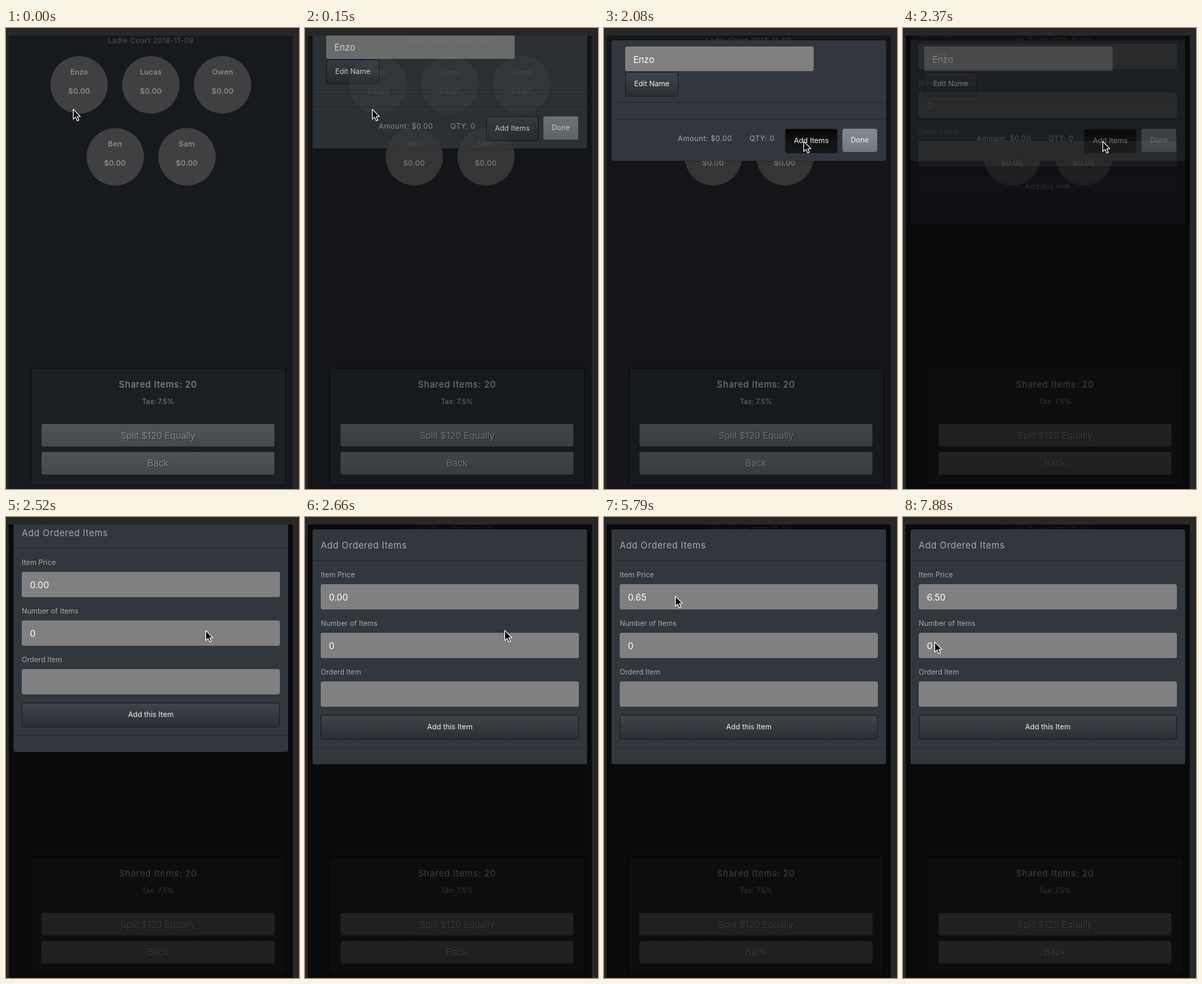
Recreate the animation shown at these times as an HTML page. Size 429 by 673 pixels, loop 8000 ms.

```html
<!DOCTYPE html>
<html lang="en">
<head>
<meta charset="utf-8">
<title>Split the bill</title>
<style>
html, body { margin: 0; width: 100%; height: 100%; overflow: hidden; background: #272727; }
body { position: relative; font-family: Inter, Roboto, "Liberation Sans", sans-serif; }
div, svg { position: absolute; box-sizing: border-box; }
.fill { left: 0; top: 0; width: 429px; height: 673px; }
#view { clip-path: inset(11px 9px 0 4px); background: #272b30; }
.shade { background: #000; opacity: 0; }
.text { white-space: pre; line-height: 20px; height: 20px; }
.head { font-size: 13px; letter-spacing: .58px; color: #a9abae; }
.lead { font-size: 13px; letter-spacing: .55px; color: #dcdcdc; font-weight: 500; }
.date { font-size: 10.5px; letter-spacing: .45px; color: #818487; }
.label { font-size: 10.5px; color: #a6a9ac; }
.tax { font-size: 10.4px; color: #d0d2d4; }
.sum { font-size: 10.5px; letter-spacing: .45px; color: #a6a9ac; }
.bold { font-size: 11px; font-weight: 600; color: #e4e4e4; }
.value { font-size: 13.1px; color: #fff; }
.small { font-size: 10.7px; color: #f2f2f2; }
.big { font-size: 13.6px; letter-spacing: -.2px; color: #dedede; text-shadow: 1px 1px 1px rgba(0,0,0,.4); }
.disc { border-radius: 50%; background: #6b6a6d; }
.panel { background: #2d343a; border: 1px solid #111315; border-radius: 3px; }
.modal { background: #32373d; border-radius: 3px; box-shadow: 0 0 2px rgba(0,0,0,.5); }
.line { background: #272b30; }
.input { background: #808080; border-radius: 3px; }
.dark { background: linear-gradient(#40454c, #33383d 60%, #2b2f34); border: 1px solid #1a1c1f; border-radius: 3px; }
.dark.hover { background: linear-gradient(#020202, #101112 40%, #141618); }
.light { background: linear-gradient(#82898e, #7a8288 60%, #70787d); border-radius: 3px; }
#caret { background: #fff; }
</style>
</head>
<body>
<div id="view" class="fill">
  <div id="page" class="fill"></div>
  <div id="shade1" class="fill shade"></div>
  <div id="person" class="fill"></div>
  <div id="shade2" class="fill shade"></div>
  <div id="order" class="fill"></div>
</div>
<svg id="cursor" width="16" height="24" viewBox="-2 -2 16 24">
  <path d="M.5 .6V15.2L3.9 12.1 6.3 17.5 8.7 16.5 6.4 11.2H10.8Z" fill="#000" stroke="#fff" stroke-width="1.1" stroke-linejoin="round"/>
</svg>
<script>
const $ = id => document.getElementById(id);
const [page, person, order] = ['page', 'person', 'order'].map($);

function box(parent, cls, x, y, w, h) {
  const el = document.createElement('div');
  el.className = cls;
  el.style.cssText = `left:${x}px;top:${y}px;width:${w}px;height:${h}px`;
  parent.append(el);
  return el;
}

// y is the middle of the capitals
function text(parent, cls, x, y, str, centred) {
  const el = document.createElement('div');
  el.className = 'text ' + cls;
  el.textContent = str;
  el.style.top = y - 10 + 'px';
  el.style.left = (centred ? x - 150 : x) + 'px';
  if (centred) { el.style.width = '300px'; el.style.textAlign = 'center'; }
  parent.append(el);
  return el;
}

function button(parent, cls, textCls, x, y, w, h, str) {
  const el = box(parent, cls, x, y, w, h);
  text(parent, textCls, x + w / 2, y + h / 2, str, true);
  return el;
}

// Bill page
text(page, 'date', 212, 19, 'Ladle Court 2018-11-09', true);
const guests = [['Enzo', 107, 83], ['Lucas', 212, 83], ['Owen', 317, 83], ['Ben', 159.5, 188], ['Sam', 264.5, 188]];
for (const [name, x, y] of guests) {
  box(page, 'disc', x - 42, y - 42, 84, 84);
  text(page, 'bold', x, y - 19.5, name, true);
  text(page, 'bold', x, y + 9, '$0.00', true);
}
box(page, 'panel', 36, 496, 374, 172);
text(page, 'lead', 222.5, 520, 'Shared Items: 20', true);
text(page, 'tax', 222.5, 546, 'Tax: 7.5%', true);
button(page, 'light', 'big', 52, 578, 341, 33, 'Split $120 Equally');
button(page, 'light', 'big', 52, 618.5, 341, 33.5, 'Back');

// Person dialog
box(person, 'modal', 11, 18, 402, 176);
box(person, 'input', 31, 27, 276, 36);
text(person, 'value', 43, 46, 'Enzo');
button(person, 'dark', 'small', 31, 64, 78, 36, 'Edit Name');
box(person, 'line', 11, 108, 402, 1);
box(person, 'line', 11, 133, 402, 1);
text(person, 'sum', 108, 161.5, 'Amount: $0.00');
text(person, 'sum', 213, 161.5, 'QTY: 0');
const addItems = button(person, 'dark', 'small', 265, 146.5, 77, 36, 'Add Items');
button(person, 'light', 'small', 349, 147, 51, 34, 'Done');

// Order dialog
box(order, 'modal', 11, 18, 402, 343);
text(order, 'head', 23, 41, 'Add Ordered Items');
box(order, 'line', 11, 63, 402, 1);
const fields = ['Item Price', 'Number of Items', 'Orderd Item'].map((label, i) => {
  const y = 98 + i * 71;
  text(order, 'label', 23, y - 13, label);
  box(order, 'input', 23, y, 378, 37);
  return text(order, 'value', 35, y + 19, ['0.00', '0', ''][i]);
});
button(order, 'dark', 'small', 23, 289, 378, 36, 'Add this Item');
box(order, 'line', 11, 336, 402, 1);
const caret = box(order, '', 64, 107, 1, 18);
caret.id = 'caret';

// Step tables: start time, then the values held from then on
const LOOP = 8000;
const cursorSteps = [
  [0, 98, 118], [740, 141, 132], [890, 188, 143], [1040, 232, 153], [1190, 266, 160],
  [1330, 285, 164], [1480, 292, 165], [2810, 232, 150], [2960, 134, 123], [3100, 102, 115],
  [3250, 104, 115], [7580, 70, 142], [7730, 24, 174], [7880, 46, 182]
];
// opacity, vertical offset
const personSteps = [[0, 0, -44], [150, .8, -18], [300, 1, -1], [450, 1, 0]];
const orderSteps = [[0, 0, -86], [2370, .15, -75], [2520, 1, -18], [2660, 1, 0]];
const shade1Steps = [[0, .4], [150, .5]];
const shade2Steps = [[0, 0], [2220, .1], [2370, .5]];
const priceSteps = [[0, '0.00'], [5040, '0.06'], [5340, '0.65'], [5940, '6.50'], [6090, '65.00'], [7140, '6.50']];
// left edge of the caret, 0 when hidden
const caretSteps = [[0, 0], [3550, 64], [3990, 0], [4440, 64], [5790, 0], [5940, 64], [6090, 72], [6540, 0], [7140, 64], [7580, 0]];

const at = (steps, t) => steps.findLast(s => s[0] <= t).slice(1);

function place(el, steps, t) {
  const [opacity, y] = at(steps, t);
  el.style.opacity = opacity;
  el.style.transform = y ? `translateY(${y}px)` : 'none';
}

function render(t) {
  const [cx, cy] = at(cursorSteps, t);
  $('cursor').style.left = cx - 2 + 'px';
  $('cursor').style.top = cy - 2 + 'px';
  place(person, personSteps, t);
  place(order, orderSteps, t);
  $('shade1').style.opacity = at(shade1Steps, t)[0];
  $('shade2').style.opacity = at(shade2Steps, t)[0];
  addItems.classList.toggle('hover', t >= 2080);
  fields[0].textContent = at(priceSteps, t)[0];
  const [x] = at(caretSteps, t);
  caret.style.left = x + 'px';
  caret.style.visibility = x ? 'visible' : 'hidden';
}

const start = performance.now();
function tick() {
  render((performance.now() - start) % LOOP);
  requestAnimationFrame(tick);
}
tick();
</script>
</body>
</html>
```
